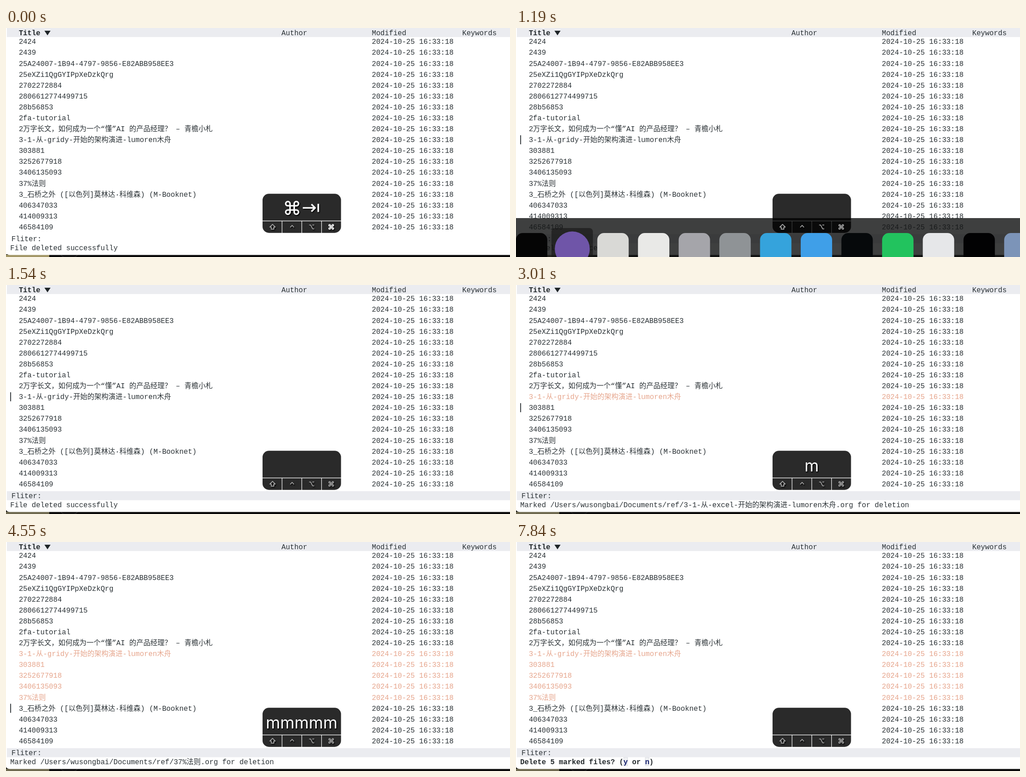
These frames come from a looping animation (1108x506 px, 8000 ms). An HTML page with a canvas:

```html
<!DOCTYPE html>
<html lang="zh">
<head>
<meta charset="utf-8">
<title>File list</title>
<style>
  html, body { margin: 0; width: 100%; height: 100%; overflow: hidden; background: #fff; }
  canvas { display: block; width: 1108px; height: 506px; }
</style>
</head>
<body>
<canvas id="stage"></canvas>
<script>
const W = 1108, H = 506, LOOP = 8000;
const canvas = document.getElementById('stage');
const ctx = canvas.getContext('2d');
const dpr = window.devicePixelRatio || 1;
canvas.width = W * dpr;
canvas.height = H * dpr;

const MONO = '15.77px "Liberation Mono", "DejaVu Sans Mono", monospace';
const CJK = '15.5px "Noto Sans CJK SC", "Noto Sans CJK JP", "Noto Sans CJK", sans-serif';
const KEYS = '36px Inter, Roboto, sans-serif';
const INK = '#2a3135', MARKED = '#e6a58c', BAR = '#ebecf0';
const LEFT = 9.2, CELL = 9.464, ROW = 24.09;
const col = n => LEFT + n * CELL;

const titles = [
  '2424', '2439', '25A24007-1B94-4797-9856-E82ABB958EE3', '25eXZi1QgGYIPpXeDzkQrg',
  '2702272884', '2806612774499715', '28b56853', '2fa-tutorial',
  '2万字长文，如何成为一个“懂”AI 的产品经理？ – 青檐小札',
  '3-1-从-gridy-开始的架构演进-lumoren木舟', '303881', '3252677918', '3406135093',
  '37%法则', '3_石桥之外 ([以色列]莫林达·科维森) (M-Booknet)',
  '406347033', '414009313', '46584109'
];
const files = ['3-1-从-excel-开始的架构演进-lumoren木舟', ...titles.slice(10, 14)];
const FIRST = 9;
const markTimes = [2870, 3360, 3640, 3990, 4550];
const PROMPT = 6020, FOCUS = 1190;

const icons = [
  '#050505', '#6f55a8', '#d9d9d6', '#e9e9e7', '#a5a5aa', '#8f9396', '#35a3dc',
  '#3f9fe8', '#06090b', '#22c35e', '#e6e7e9', '#020203', '#7c94b8'
];

const within = (t, a, b) => t >= a && t < b;

function write(text, x, y, color = INK, bold = false) {
  ctx.fillStyle = color;
  for (const run of text.match(/[\u3001-\u9fff\uff00-\uffef]+|[^\u3001-\u9fff\uff00-\uffef]+/g)) {
    ctx.font = (bold ? 'bold ' : '') + (/[\u3001-\u9fff]/.test(run) ? CJK : MONO);
    ctx.fillText(run, x, y);
    x += ctx.measureText(run).width;
  }
}

function box(x, y, w, h, color, r = 0) {
  ctx.fillStyle = color;
  ctx.beginPath();
  ctx.roundRect(x, y, w, h, r);
  ctx.fill();
}

function lines(...paths) {
  ctx.beginPath();
  for (const p of paths) p.forEach(([x, y], i) => i ? ctx.lineTo(x, y) : ctx.moveTo(x, y));
  ctx.stroke();
}

// Modifier glyphs, drawn around the origin
const glyphs = {
  shift() {
    lines([[0, -5.6], [6, .4], [2.9, .4], [2.9, 5], [-2.9, 5], [-2.9, .4], [-6, .4], [0, -5.6], [1, -4.6]]);
  },
  control() { lines([[-4.2, 1], [0, -3.4], [4.2, 1]]); },
  option() {
    lines([[-5.6, -4.2], [-2.3, -4.2], [2.2, 4.4], [5.6, 4.4]], [[1.4, -4.2], [5.6, -4.2]]);
  },
  command() {
    const a = 1.7, r = 1.75;
    ctx.beginPath();
    for (let i = 0; i < 4; i++) {
      ctx.moveTo(-a - r, a);
      ctx.lineTo(a + r, a);
      ctx.moveTo(a, a + r);
      ctx.arc(a + r, a + r, r, Math.PI, -Math.PI / 2, true);
      ctx.rotate(Math.PI / 2);
    }
    ctx.stroke();
  },
  tab() { lines([[-17, 0], [9, 0]], [[2, -8], [10, 0], [2, 8]], [[17, -9], [17, 9]]); }
};

function glyph(name, x, y, color, scale, weight) {
  ctx.save();
  ctx.translate(x, y);
  ctx.scale(scale, scale);
  ctx.strokeStyle = color;
  ctx.lineWidth = weight / scale;
  glyphs[name]();
  ctx.restore();
}

function drawStrip(t) {
  box(0, 500, W, 6, '#0a0a0a');
  box(0, 501, 95, 5, t < FOCUS ? '#a39767' : '#6f6a50');
  // The pill behind the window pulses with a soft fade
  const p = (t + 910) % 2100;
  const glow = p < 350 ? p / 350 : p < 1470 ? 1 : p < 1820 ? 1 - (p - 1470) / 350 : 0;
  ctx.strokeStyle = `rgba(150,150,150,${.2 + .15 * glow})`;
  ctx.lineWidth = 1;
  ctx.beginPath();
  ctx.roundRect(120.5, 490, 37, 16, 8);
  ctx.stroke();
  box(0, 0, W + 20, 501.5, '#fff', [0, 0, 8, 8]);
}

function drawList(t, marked) {
  box(2, 0, W, 20, BAR);
  write('Title', col(2), 15.5, '#1f2528', true);
  ctx.beginPath();
  ctx.moveTo(84.5, 6);
  ctx.lineTo(98, 6);
  ctx.lineTo(91.2, 16.3);
  ctx.fill();
  write('Author', col(63), 15.5);
  write('Modified', col(84), 15.5);
  write('Keywords', col(105), 15.5);

  titles.forEach((title, i) => {
    const y = 35.4 + i * ROW;
    const color = i >= FIRST && i < FIRST + marked ? MARKED : INK;
    write(title, col(2), y, color);
    write('2024-10-25 16:33:18', col(84), y, color);
  });

  const shown = within(t, FOCUS, 2030) || within(t, 2520, 5040) || within(t, 5530, PROMPT);
  if (shown) box(9.3, 237 + marked * ROW, 1.8, 20, '#23292c');
}

function drawFooter(t, marked) {
  if (t >= FOCUS) box(2, 455.5, W, 20, BAR);
  write('Fliter:', 12, 471);
  const y = 490.6;
  if (t >= PROMPT) {
    for (const c of [24, 29]) {
      box(col(c), 475.5, CELL, 19.5, '#d9dbe0');
      box(col(c) + 1, 476.5, CELL - 2, 17.5, '#f1f2f4');
    }
    write('Delete 5 marked files? (', LEFT, y, '#23292c', true);
    write('y', col(24), y, '#15206e', true);
    write(' or ', col(25), y, '#23292c', true);
    write('n', col(29), y, '#15206e', true);
    write(')', col(30), y, '#23292c', true);
    if (t < 6580 || within(t, 7070, 7560)) box(312, 475.5, 10, 19.5, '#40484c');
  } else if (marked) {
    write(`Marked /Users/wusongbai/Documents/ref/${files[marked - 1]}.org for deletion`, LEFT, y);
  } else {
    write('File deleted successfully', LEFT, y);
  }
}

function dockAlpha(t) {
  if (t < 210 || t >= 1470) return 0;
  if (t < 280) return .5;
  if (t < 1260) return 1;
  return [.4, .06, .015][Math.floor((t - 1260) / 70)];
}

function drawDock(alpha) {
  if (!alpha) return;
  ctx.save();
  ctx.globalAlpha = alpha;
  box(0, 420, W, 86, 'rgba(20,21,21,.82)');
  box(78, 442, 91, 80, 'rgba(20,20,20,.6)', 8);
  icons.forEach((color, i) => {
    const x = 34.3 + i * 89.45;
    if (i === 1) box(x - 38.5, 449.5, 77, 77, color, 38.5);
    else box(x - 34.5, 453, 69, 69, color, 15);
  });
  ctx.restore();
}

// Translucent tiles; the gaps between them let the background through
function drawTiles() {
  const x = 564, y = 366.3, w = 172.5, h = 86.4, r = 14, gap = 1.2, split = 59.5;
  const glass = 'rgba(0,0,0,.835)', cell = (w - 3 * gap) / 4;
  box(x, y, w, split, glass, [r, r, 0, 0]);
  for (let i = 0; i < 4; i++) {
    const corners = [0, 0, i === 3 ? r : 0, i === 0 ? r : 0];
    box(x + i * (cell + gap), y + split + gap, cell, h - split - gap, glass, corners);
  }
}

function drawKeys(t, marked) {
  drawTiles();
  ctx.save();
  ctx.shadowColor = '#000';
  ctx.shadowBlur = 2 * dpr;
  ctx.shadowOffsetX = 1.5 * dpr;
  ctx.shadowOffsetY = 1.8 * dpr;
  ctx.lineJoin = 'round';
  const switching = t < 910, shifting = within(t, PROMPT, 6370);
  ['shift', 'control', 'option', 'command'].forEach((name, i) => {
    const lit = name === 'command' && switching || name === 'shift' && shifting;
    glyph(name, 586 + i * 43, 439.5, lit ? '#fff' : '#a8a8a8', 1, lit ? 2 : 1.8);
  });

  ctx.fillStyle = '#fff';
  ctx.font = KEYS;
  if (switching) {
    glyph('command', 629, 397.5, '#fff', 2.7, 3.4);
    glyph('tab', 669.5, 397.5, '#fff', 1, 3.6);
  } else if (shifting) {
    glyph('shift', 631.5, 398, '#fff', 2.5, 3.2);
    ctx.fillText('D', 655, 411.8);
  } else if (marked && t < 5110) {
    ctx.textAlign = 'center';
    ctx.fillText('m'.repeat(marked), 650, 411.8);
  }
  ctx.restore();
}

function frame() {
  const t = performance.now() % LOOP;
  const marked = markTimes.filter(m => t >= m).length;
  ctx.setTransform(dpr, 0, 0, dpr, 0, 0);
  ctx.textAlign = 'left';
  ctx.textBaseline = 'alphabetic';
  drawStrip(t);
  drawList(t, marked);
  drawFooter(t, marked);
  drawDock(dockAlpha(t));
  drawKeys(t, marked);
  requestAnimationFrame(frame);
}
frame();
</script>
</body>
</html>
```
